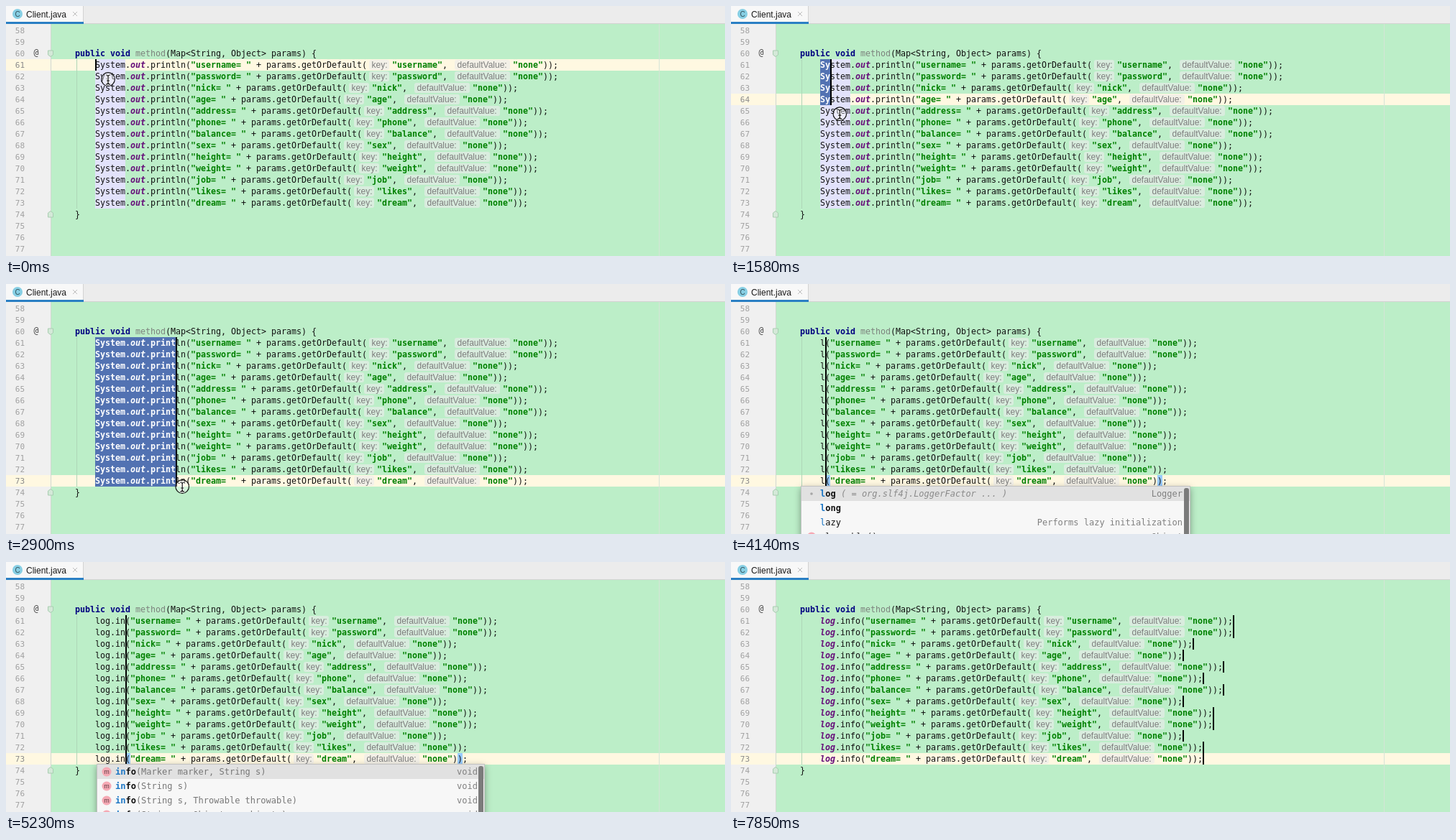
Recreate the animation shown at these times as an HTML page with a canvas. Size 1000x348 px, loop 8000 ms.

```html
<!DOCTYPE html>
<html lang="en">
<head>
<meta charset="utf-8">
<title>Multi-caret editing</title>
<style>
html, body { margin: 0; width: 100%; height: 100%; overflow: hidden; background: #bceec8; }
canvas { display: block; width: 1000px; height: 348px; }
</style>
</head>
<body>
<canvas id="stage" width="1000" height="348"></canvas>
<script>
const ctx = document.getElementById('stage').getContext('2d');
const LOOP = 8000, CELL = 7, ROW = 16, TOP = 74, LEFT = 124;
const MONO = '"DejaVu Sans Mono", monospace';
const SANS = '"Liberation Sans", sans-serif';
const CODE = '11.63px ' + MONO;
const POPUP = '12px ' + MONO;
const POPUP_CELL = 7.224;
const FIELDS = ['username', 'password', 'nick', 'age', 'address', 'phone', 'balance',
  'sex', 'height', 'weight', 'job', 'likes', 'dream'];

const PLAIN = { color: '#111' };
const STRING = { color: '#008000', font: 'bold ' };
const KEYWORD = { color: '#000080', font: 'bold ' };
const FIELD = { color: '#660e7a', font: 'italic bold ' };
const UNUSED = { color: '#7c827d' };

const TYPED = [[3970, 'l'], [4410, 'lo'], [4530, 'log'], [4700, 'log.'], [5050, 'log.i'],
  [5230, 'log.in'], [5410, 'log.inf'], [5500, 'log.info']];
const POINTER = [[0, 142, 102], [90, 142, 102], [440, 87, 82], [1040, 87, 82], [1130, 123, 82],
  [1310, 126, 92], [1580, 151, 149], [2030, 178, 246], [2300, 205, 280], [2720, 241, 282],
  [2900, 247, 282], [3080, 249, 281]];
// time, column, line
const DRAG = [[1220, 0, 0], [1580, 2, 3], [2030, 5, 10], [2210, 8, 12], [2720, 16, 12],
  [2900, 17, 12], [3080, 18, 12]];

const LOG_ITEMS = {
  l: ['log', 'long', 'lazy'],
  lo: ['log', 'long', 'lock'],
  log: ['log', 'logger', 'login']
};
const METHOD_ITEMS = ['(Marker marker, String s)', '(String s)',
  '(String s, Throwable throwable)', '(String s, Object... objects)'];

function rect(x, y, w, h, color) {
  ctx.fillStyle = color;
  ctx.fillRect(x, y, w, h);
}

function text(str, x, y, color, font, align = 'left') {
  ctx.font = font;
  ctx.fillStyle = color;
  ctx.textAlign = align;
  ctx.fillText(str, x, y);
}

function disc(x, y, r, color) {
  ctx.fillStyle = color;
  ctx.beginPath();
  ctx.arc(x, y, r, 0, Math.PI * 2);
  ctx.fill();
}

function pill(x, y, w, h, color) {
  ctx.fillStyle = color;
  ctx.beginPath();
  ctx.roundRect(x, y, w, h, 3);
  ctx.fill();
}

function track(keys, t) {
  let i = keys.findIndex(k => k[0] > t);
  if (i === 0) return keys[0].slice(1);
  if (i < 0) return keys[keys.length - 1].slice(1);
  const a = keys[i - 1], b = keys[i], f = (t - a[0]) / (b[0] - a[0]);
  return [1, 2].map(n => a[n] + (b[n] - a[n]) * f);
}

const lineTop = n => TOP + (n - 61) * ROW;

// Draws tokens on the character grid and returns the end x.
function tokens(list, x, y, override) {
  for (const [str, style] of list) {
    const s = override || style;
    text(str, x, y, s.color, ((override ? 'bold ' : '') && style.font || s.font || '') + CODE);
    x += str.length * CELL;
  }
  return x;
}

function hint(label, x, top, slot) {
  pill(x + 3, top + 1, slot - 7, 14, 'rgba(236,236,236,.62)');
  text(label, x + 6.5, top + 12, '#7d7d7d', '12px ' + SANS);
  return x + slot;
}

function statement(head, field, top) {
  const y = top + 12;
  let x = tokens([...head, ['(', PLAIN], [`"${field}= "`, STRING],
    [' + params.getOrDefault(', PLAIN]], LEFT, y);
  x = hint('key:', x, top, 35);
  x = tokens([[`"${field}"`, STRING], [', ', PLAIN]], x, y);
  x = hint('defaultValue:', x, top, 84);
  return tokens([['"none"', STRING], ['));', PLAIN]], x, y);
}

// Width of everything after the call head, up to the line end.
const tailWidth = field => (1 + field.length + 4 + 23 + field.length + 2 + 2 + 6 + 3) * CELL + 119;

function header() {
  rect(0, 0, 1000, 25, '#ececec');
  rect(0, 24, 1000, 1, '#d2d2d2');
  rect(0, 0, 107, 22, '#f8f8f8');
  rect(107, 0, 1, 24, '#d2d2d2');
  rect(0, 22, 108, 3, '#2a7fc4');
  disc(16, 11, 7, '#87cfe4');
  text('C', 16, 15, '#33525c', '10px ' + SANS, 'center');
  text('Client.java', 28, 15.5, '#1a1a1a', '12px ' + SANS);
  ctx.strokeStyle = '#bdbdbd';
  ctx.lineWidth = 1;
  ctx.beginPath();
  ctx.moveTo(93, 8); ctx.lineTo(99, 14);
  ctx.moveTo(99, 8); ctx.lineTo(93, 14);
  ctx.stroke();
}

function foldMark(y, up) {
  ctx.fillStyle = '#d4e9d8';
  ctx.strokeStyle = '#a9cdb1';
  ctx.lineWidth = 1;
  ctx.beginPath();
  const d = up ? -1 : 1;
  ctx.moveTo(58.5, y - 4 * d); ctx.lineTo(65.5, y - 4 * d); ctx.lineTo(65.5, y + 2 * d);
  ctx.lineTo(62, y + 4.5 * d); ctx.lineTo(58.5, y + 2 * d);
  ctx.closePath();
  ctx.fill();
  ctx.stroke();
}

function background(current) {
  rect(0, 0, 1000, 348, '#bceec8');
  rect(0, 25, 62, 323, '#f0f0f0');
  rect(0, lineTop(current), 1000, ROW, '#fff8e1');
  rect(62, 25, 1, 323, '#cfd8d0');
  rect(908, 25, 1, 323, '#d4e4d7');
  rect(98, TOP, 1, 13 * ROW, '#aed6b7');
  for (let n = 58; n <= 77; n++) {
    text(n, 26, lineTop(n) + 12, n === current ? '#8a8a8a' : '#a0a0a0', '11px ' + MONO, 'right');
  }
  text('@', 42, lineTop(60) + 11, '#444', '11.5px ' + MONO, 'center');
  foldMark(66, false);
  foldMark(290, true);
  tokens([['public void ', KEYWORD], ['method', UNUSED],
    ['(Map<String, Object> params) {', PLAIN]], 96, lineTop(60) + 12);
  tokens([['}', PLAIN]], 96, lineTop(74) + 12);
}

function popupFrame(x, right) {
  ctx.save();
  ctx.shadowColor = 'rgba(0,0,0,.35)';
  ctx.shadowBlur = 9;
  ctx.shadowOffsetY = 2;
  rect(x, 282, right - x, 80, '#f7f7f7');
  ctx.restore();
  rect(x, 282, right - x, 20, '#e1e1e1');
  ctx.strokeStyle = '#c2c2c2';
  ctx.lineWidth = 1;
  ctx.strokeRect(x + .5, 281.5, right - x - 1, 90);
  pill(right - 9, 284, 7, 90, '#7b7b7b');
}

function matched(name, prefix, x, y, bold) {
  const font = (bold ? 'bold ' : '') + POPUP;
  text(name.slice(0, prefix.length), x, y, '#1a75c4', font);
  text(name.slice(prefix.length), x + prefix.length * POPUP_CELL, y, '#111', font);
}

function methodIcon(x, y) {
  disc(x, y, 6.5, '#f5a9b4');
  text('m', x, y + 3, '#5d3a40', '9px ' + SANS, 'center');
}

function logPopup(prefix) {
  popupFrame(97, 639);
  LOG_ITEMS[prefix].forEach((name, i) => matched(name, prefix, 124, 296 + i * 20, i < 2));
  disc(112, 292, 1.8, '#a5a5a5');
  text('( = org.slf4j.LoggerFactor ... )', 153, 296, '#8a8a8a', 'italic ' + POPUP);
  text('Logger', 628, 296, '#808080', POPUP, 'right');
  if (prefix === 'l') text('Performs lazy initialization', 628, 336, '#808080', POPUP, 'right');
  methodIcon(112, 352);
  text('cloneable()', 124, 356, '#333', POPUP);
  text('Object', 628, 356, '#808080', POPUP, 'right');
}

function methodPopup(prefix) {
  popupFrame(126, 666);
  METHOD_ITEMS.forEach((args, i) => {
    const y = 296 + i * 20;
    methodIcon(140, y - 4);
    matched('info', prefix, 152, y, true);
    text(args, 152 + 4 * POPUP_CELL, y, '#777', POPUP);
    text('void', 656, y, '#808080', POPUP, 'right');
  });
}

function pointer(x, y) {
  ctx.strokeStyle = '#111';
  ctx.fillStyle = 'rgba(255,255,255,.35)';
  ctx.lineWidth = 1.2;
  ctx.beginPath();
  ctx.arc(x, y, 9.3, 0, Math.PI * 2);
  ctx.fill();
  ctx.stroke();
  const beam = () => {
    ctx.beginPath();
    ctx.moveTo(x - 3, y - 6); ctx.quadraticCurveTo(x, y - 6, x, y - 4);
    ctx.quadraticCurveTo(x, y - 6, x + 3, y - 6);
    ctx.moveTo(x, y - 4); ctx.lineTo(x, y + 5);
    ctx.moveTo(x - 3, y + 7); ctx.quadraticCurveTo(x, y + 7, x, y + 5);
    ctx.quadraticCurveTo(x, y + 7, x + 3, y + 7);
    ctx.moveTo(x - 2, y + 2); ctx.lineTo(x + 2, y + 2);
    ctx.stroke();
  };
  ctx.strokeStyle = '#fff';
  ctx.lineWidth = 3;
  beam();
  ctx.strokeStyle = '#111';
  ctx.lineWidth = 1.2;
  beam();
}

function draw(t) {
  const typed = TYPED.filter(k => k[0] <= t).pop()?.[1];
  const tick = Math.floor((t + 40) / 90) * 90 - 40;
  const step = Math.max(0, Math.min(t, tick));
  const [colAt, rowAt] = track(DRAG, step + 5);
  const col = Math.floor(colAt + .1), last = typed ? 12 : Math.floor(rowAt + .1);
  const atEnd = t >= 6030;
  const caretOn = !(t >= 800 && t < 1130 || t >= 3800 && t < 3970 || t >= 7320 && t < 7850);

  background(61 + last);
  const original = [['System.', PLAIN], ['out', FIELD], ['.println', PLAIN]];
  const head = !typed ? original : t >= 6390
    ? [['log', FIELD], ['.info', PLAIN]]
    : [[typed, PLAIN]];
  const headWidth = (typed || 'System.out.println').length * CELL;

  FIELDS.forEach((field, i) => {
    const top = TOP + i * ROW;
    const selected = !typed && i <= last ? col * CELL : 0;
    if (!typed) rect(LEFT, top, 6 * CELL, ROW, '#e2e2fb');
    if (typed && !atEnd && i === last) {
      rect(LEFT + headWidth, top, CELL, ROW, '#99ccff');
      rect(LEFT + headWidth + tailWidth(field) - 2 * CELL, top, CELL, ROW, '#99ccff');
    }
    const end = statement(head, field, top);
    if (selected) {
      ctx.save();
      ctx.beginPath();
      ctx.rect(LEFT, top, selected, ROW);
      ctx.clip();
      rect(LEFT, top, selected, ROW, '#5272b2');
      tokens(original, LEFT, top + 12, { color: '#fff', font: 'bold ' });
      ctx.restore();
    }
    if (caretOn && i <= last) {
      const x = atEnd ? end : LEFT + (typed ? headWidth : selected);
      rect(x, top, 2, ROW, '#000');
    }
  });

  if (t >= 4060 && t < 4700) logPopup(typed);
  if (t >= 4790 && t < 5940) methodPopup(typed.slice(4));
  header();
  if (t < 3350) pointer(...track(POINTER, step + 5));
}

const start = performance.now();
function frame(now) {
  draw(Math.max(0, now - start) % LOOP);
  requestAnimationFrame(frame);
}
draw(0);
requestAnimationFrame(frame);
</script>
</body>
</html>
```
